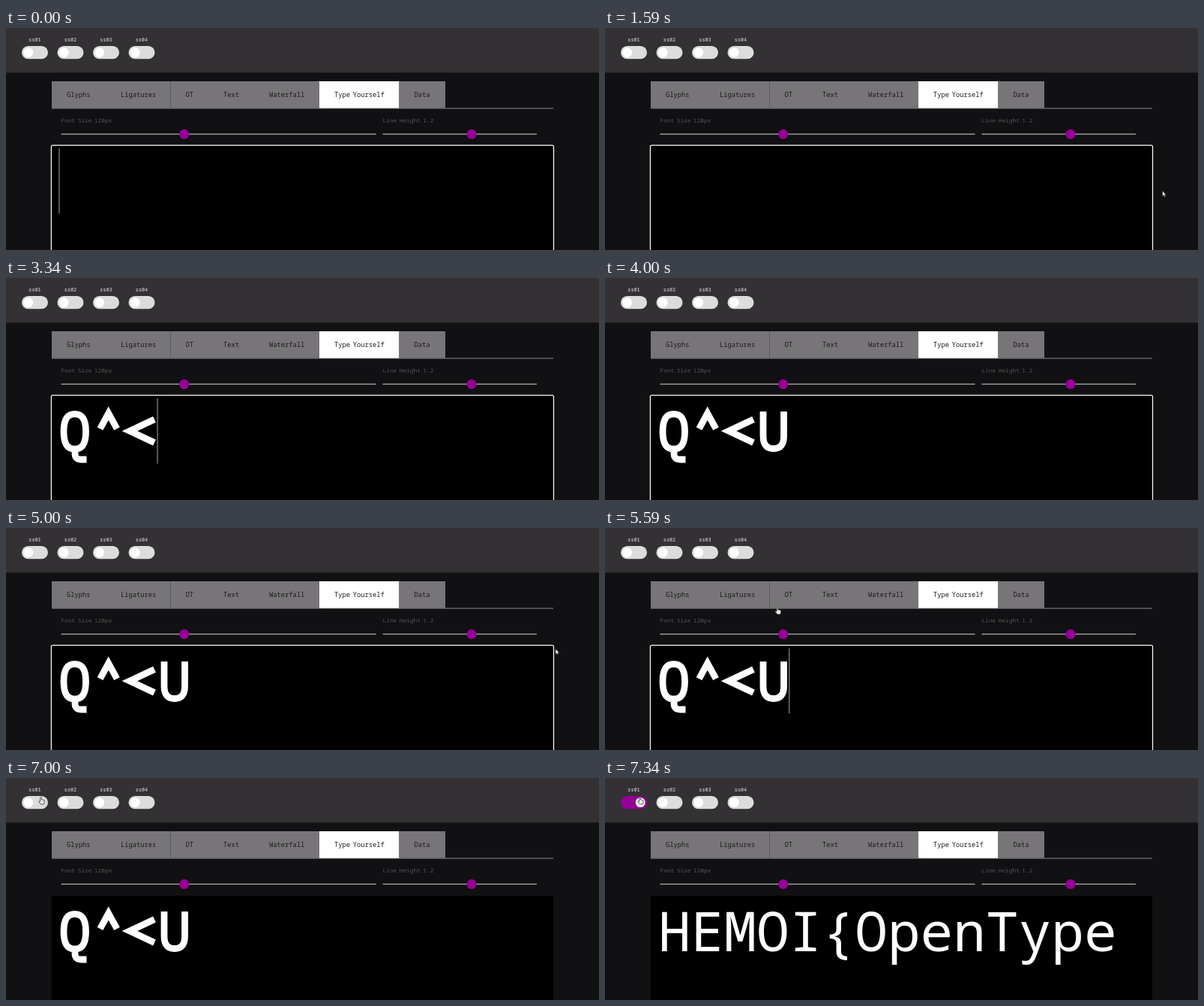
An HTML page with a canvas that plays this animation: 791x296 px, repeating every 8000 ms.

```html
<!DOCTYPE html>
<html lang="en">
<head>
<meta charset="utf-8">
<title>Type tester</title>
<style>
html, body { margin: 0; width: 791px; height: 296px; overflow: hidden; background: #111012; }
canvas { display: block; width: 791px; height: 296px; }
</style>
</head>
<body>
<canvas id="stage" role="img" aria-label="Font tester: typing Q^&lt;U, then switching on ss01"></canvas>
<script>
const W = 791, H = 296, LOOP = 8000, FPS = 12;
const PURPLE = '#960096';
const FONT = '"Noto Sans Mono", "DejaVu Sans Mono", monospace';
const ADVANCE = 43.7, TEXT_X = 71, BASE = 231;

const canvas = document.getElementById('stage');
const ctx = canvas.getContext('2d');
const dpr = window.devicePixelRatio || 1;
canvas.width = W * dpr;
canvas.height = H * dpr;

// Times below are in ticks of 1/12 s.
const CARET_ON = [[0, 7], [13, 19], [26, 32], [38, 48], [54, 60], [66, 72], [79, 83]];
const TYPE_AT = 38, MOVE_AT = 60, MOVE_END = 75, BLUR_AT = 83, SWITCH_AT = 86;

const TABS = [
  ['Glyphs', 61, 133], ['Ligatures', 133, 219.5], ['OT', 219.5, 270],
  ['Text', 270, 331], ['Waterfall', 331, 418], ['Type Yourself', 418, 524.5], ['Data', 524.5, 586]
];

const clamp = v => Math.max(0, Math.min(1, v));
const mix = (a, b, p) => a + (b - a) * p;

function rect(x, y, w, h, color) {
  ctx.fillStyle = color;
  ctx.fillRect(x, y, w, h);
}

function pill(x, y, w, h, r, color) {
  ctx.fillStyle = color;
  ctx.beginPath();
  ctx.roundRect(x, y, w, h, r);
  ctx.fill();
}

function dot(x, y, r, color) {
  ctx.fillStyle = color;
  ctx.beginPath();
  ctx.arc(x, y, r, 0, Math.PI * 2);
  ctx.fill();
}

// Words sit closer together than a full monospace cell.
function label(text, x, y, advance, color, weight = 400) {
  ctx.font = `${weight} ${advance / 0.6}px ${FONT}`;
  ctx.fillStyle = color;
  for (const word of text.split(' ')) {
    ctx.fillText(word, x, y);
    x += word.length * advance + advance * 0.72;
  }
}

function toggle(i, p) {
  const x = 21 + i * 47.5;
  const [r, g, b] = [150, 0, 150].map(c => Math.round(mix(220, c, p)));
  label('ss0' + (i + 1), x + 9.3, 17.7, 4.08, '#aaa8aa', 700);
  pill(x, 24, 35, 17.3, 8.65, `rgb(${r},${g},${b})`);
  dot(x + mix(8.8, 26.2, p), 32.6, 6.4, '#fff');
}

function slider(x, end, thumb, text) {
  label(text, x, 126, 4.7, '#565456');
  rect(x, 140.8, end - x, 1.4, '#a5a3a5');
  dot(thumb, 141.6, 6.5, PURPLE);
}

function page(switched) {
  rect(0, 0, W, H, '#111012');
  rect(0, 0, W, 59.5, '#333133');
  for (let i = 0; i < 4; i++) toggle(i, i ? 0 : switched);
  rect(61, 106.6, 669, 1, '#8a888a');
  TABS.forEach(([name, x, end], i) => {
    rect(x, 71, end - x, 35.8, i === 5 ? '#fff' : '#777577');
    label(name, x + 20, 91.6, 5.25, '#1c1a1c');
  });
  slider(73.5, 493.5, 237.7, 'Font Size 120px');
  slider(502.5, 708, 621, 'Line Height 1.2');
}

function editor(focused) {
  rect(61, 157, 669, 150, '#000');
  if (!focused) return;
  ctx.strokeStyle = '#f4f4f4';
  ctx.lineWidth = 1.3;
  ctx.beginPath();
  ctx.roundRect(60.4, 156.3, 670.1, 160, 2);
  ctx.stroke();
}

const LETTERS = [
  ['Q', 'M91.7 181.3C102 181.3 106.5 189 106.5 204.7S102 228 91.7 228S77 220.4 77 204.7S81.400 181.3 91.7 181.3Z'
      + 'M92 229V234Q92 242 100 242H107.500'],
  ['^', 'M125.5 201L136.700 180.500L148 201'],
  ['<', 'M198 188.500L165 204L198 219.500'],
  ['U', 'M211 178V211Q211 227.500 224.800 227.500T238.500 211V178']
];

function typed(count) {
  ctx.strokeStyle = '#fff';
  ctx.lineWidth = 8.8;
  ctx.lineJoin = 'miter';
  ctx.lineCap = 'butt';
  for (const [, path] of LETTERS.slice(0, count)) ctx.stroke(new Path2D(path));
}

function sample() {
  ctx.font = `500 ${ADVANCE / 0.6}px ${FONT}`;
  ctx.fillStyle = '#fff';
  ctx.fillText('HEMOI{OpenType', TEXT_X, BASE);
}

const ARROW = new Path2D('M0 0V7.400L1.700 5.900L2.900 8.300L4 7.800L2.900 5.400H5.100Z');
const HAND = new Path2D('M2.200 6V1Q2.200 0 3 0T3.900 1V3.600L6.800 4.200Q8 4.500 7.800 5.700'
  + 'L7.100 9.700H3L.4 6.600Q0 5.700.9 5.500Z');

function pointer(x, y, hand) {
  ctx.save();
  ctx.translate(hand ? x - 3 : x, y);
  ctx.lineWidth = hand ? 0.9 : 0.7;
  ctx.strokeStyle = hand ? '#444' : '#222';
  ctx.fillStyle = hand ? '#eee' : '#fff';
  const shape = hand ? HAND : ARROW;
  ctx.fill(shape);
  ctx.stroke(shape);
  ctx.restore();
}

function mouse(tick) {
  if (tick === 19) pointer(743.5, 217, false);
  if (tick < MOVE_AT) return;
  const p = clamp((tick - MOVE_AT) / (MOVE_END - MOVE_AT));
  const x = mix(733, 46.5, 1 - (1 - p) ** 2.1);
  const y = mix(161, 25.3, p ** 1.17);
  const onTab = x > 61 && x < 586 && y > 71 && y < 107;
  pointer(x, y, onTab || (x < 56 && y < 41));
}

function draw(ms) {
  const tick = Math.floor(ms * FPS / 1000 + 0.001);
  const p = clamp((tick * 1000 / FPS - 7095) / 235);
  ctx.setTransform(dpr, 0, 0, dpr, 0, 0);
  page(p * p * (3 - 2 * p));
  editor(tick < BLUR_AT);
  const count = Math.max(0, Math.min(LETTERS.length, tick - TYPE_AT + 1));
  if (tick >= SWITCH_AT) sample();
  else typed(count);
  if (CARET_ON.some(([on, off]) => tick >= on && tick < off)) {
    rect(TEXT_X - 0.6 + count * ADVANCE, 160.5, 1.1, 87, '#9a9a9a');
  }
  mouse(tick);
}

const start = performance.now();
function loop() {
  draw((performance.now() - start) % LOOP);
  requestAnimationFrame(loop);
}
loop();
</script>
</body>
</html>
```
